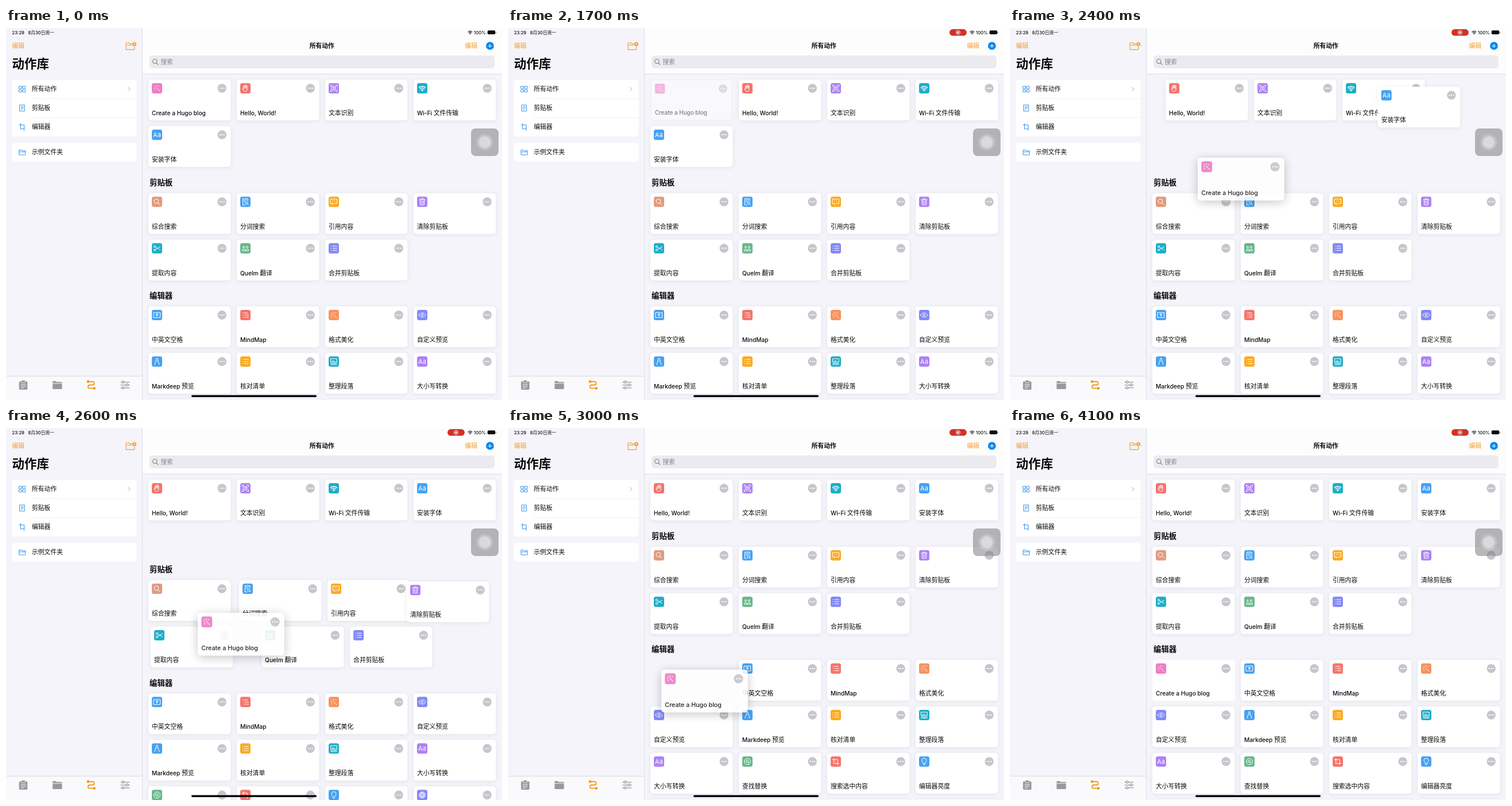
These frames come from a looping animation (864 px wide and 648 px high, 4.2 s). An HTML page:

```html
<!DOCTYPE html>
<html lang="zh-CN">
<head>
<meta charset="utf-8">
<title>动作库</title>
<style>
html, body { margin: 0; width: 100%; height: 100%; overflow: hidden; background: #f4f4fa; }
svg { display: block; }
text { font-family: Inter, "Noto Sans CJK SC", "Noto Sans CJK", "Noto Sans CJK JP", sans-serif; font-size: 10.8px; white-space: pre; fill: #0a0a0c; }
.en { font-size: .945em; }
.label { font-weight: 500; }
.head { font-size: 13.4px; font-weight: 600; }
.title { font-size: 21.5px; font-weight: 700; }
.status { font-size: 7.7px; font-weight: 500; }
.orange { fill: #f79a1f; }
.line { fill: none; stroke-linecap: round; stroke-linejoin: round; }
.card > rect:first-child { filter: drop-shadow(0 1px 3px rgba(20, 20, 50, .09)); }
</style>
</head>
<body>
<svg id="stage" width="864" height="648" viewBox="0 0 864 648"></svg>
<script>
const LOOP = 4200, STEP = 100;
const COL = 154, ROW = 81, LEFT = 248, TOP = 90, W = 143.5, H = 71;
const stage = document.getElementById('stage');

const ring = (x, y, r) => `M${x - r} ${y}a${r} ${r} 0 1 0 ${2 * r} 0a${r} ${r} 0 1 0 ${-2 * r} 0`;
const line = (d, color, width = 1) =>
  `<path class="line" d="${d}" stroke="${color}" stroke-width="${width}"/>`;
const box = (x, y, w, h, r, fill, extra = '') =>
  `<rect x="${x}" y="${y}" width="${w}" height="${h}" rx="${r}" fill="${fill}" ${extra}/>`;
const disc = (x, y, r, fill) => `<circle cx="${x}" cy="${y}" r="${r}" fill="${fill}"/>`;
const text = (x, y, s, cls = '', extra = '') => `<text x="${x}" y="${y}" class="${cls}" ${extra}>${s}</text>`;
const mixed = s => s.replace(/[A-Za-z,!\- ]+/g, m => `<tspan class="en">${m}</tspan>`);

const glyphs = {
  wand: 'M8 8l6 6M5 5l1 1M8.7 3.8v1.4M3.8 8.7h1.4M12.6 4.9l-1 1M4.9 12.6l1-1',
  hand: 'M5.6 9.8V6a.8.8 0 0 1 1.6 0V4.8a.8.8 0 0 1 1.6 0V4a.8.8 0 0 1 1.6 0v1a.8.8 0 0 1 1.6 0v5.5c0 2.5-1.4 4-3.4 4-2 0-3-1.3-4.6-4.4.3-.8 1-.8 1.6.2M7.2 6v3M8.8 5v4M10.4 5v4',
  scan: 'M3.5 6V3.5H6M12 3.5h2.5V6M14.5 12v2.5H12M6 14.5H3.5V12M6.2 6h5.6v6H6.2zM7.9 8.2h2.2M9 8.2v2.2',
  wifi: 'M3.6 7.9a7.8 7.8 0 0 1 10.8 0M5.5 10.2a5 5 0 0 1 7 0M7.5 12.2a2.3 2.3 0 0 1 3 0M9 13.6v.1',
  find: ring(8, 8, 3.8) + 'M10.9 10.9l3.4 3.4',
  docFind: 'M13 7.5v-4H4.5v11H8M6.5 6H11M6.5 8.3H8.5' + ring(11, 11.2, 2.2) + 'M12.6 12.8l1.7 1.7',
  quote: 'M3.5 4.3h11v7.7H8.3l-2.2 2v-2H3.5zM7.2 7.4v1.3M10.8 7.4v1.3',
  trash: 'M4 5.3h10M7 5V3.6h4V5M5.2 5.3l.5 9h6.6l.5-9M7.7 7.5v4.6M10.3 7.5v4.6',
  cut: ring(5, 6, 1.6) + ring(5, 12, 1.6) + 'M6.4 7l8 4.7M6.4 11l8-4.7',
  people: ring(6, 7, 1.5) + ring(12, 7, 1.5) + 'M3.2 13c0-3.6 5.6-3.6 5.6 0zM9.2 13c0-3.6 5.6-3.6 5.6 0z',
  list: 'M7 5.3h7.3M7 9h7.3M7 12.7h7.3M4 5.3h.4M4 9h.4M4 12.7h.4',
  frame: 'M3.3 4.7h11.4v8.6H3.3zM7.2 7.2h3.6M9 6.6v4.6M7.4 9.2h3.2',
  mind: 'M3.8 5.3h.3M6.3 5.3h6.5M5.3 9h.3M7.8 9h6.5M5.3 12.7h.3M7.8 12.7h6.5',
  eye: 'M2.9 9c3-5 9.2-5 12.2 0-3 5-9.2 5-12.2 0z' + ring(9, 9, 1.7),
  compass: 'M8.4 3.4L5 14.5M9.6 3.4l3.4 11.1M8.4 3.4h1.2M8 8a1.2 1.2 0 0 0 2 0',
  panel: 'M3.8 4h10.4v6H3.8zM6 8h4M3.8 12.2h10.4M3.8 14.3h10.4',
  lens: ring(9, 9, 5.4) + ring(8.6, 8.6, 2.1) + 'M10.2 10.2l1.8 1.8',
  crop: 'M5.7 3.2v9.1h9M3.2 5.7h9.1v9',
  bulb: 'M7.2 12c0-1.8-2.1-2.4-2.1-4.9a3.9 3.9 0 0 1 7.8 0c0 2.5-2.1 3.1-2.1 4.9zM7.4 14.2h3.2',
  globe: ring(9, 9, 5.3) + 'M3.7 9h10.6M4.6 6.3h8.8M4.6 11.7h8.8M9 3.7c-3 3-3 7.6 0 10.6 3-3 3-7.6 0-10.6'
};

const BLUE = '#46a2f3', RED = '#f5746c', VIOLET = '#ac82f7', TEAL = '#1eadc9',
  AMBER = '#fbaa20', GREEN = '#67b88a', INDIGO = '#8388f7', PINK = '#f07bc4';

const groups = {
  top: [['Hello, World!', RED, 'hand'], ['文本识别', VIOLET, 'scan'],
    ['Wi-Fi 文件传输', TEAL, 'wifi'], ['安装字体', BLUE, 'Aa']],
  clip: [['综合搜索', '#e29a7e', 'find'], ['分词搜索', BLUE, 'docFind'], ['引用内容', AMBER, 'quote'],
    ['清除剪贴板', VIOLET, 'trash'], ['提取内容', TEAL, 'cut'], ['Quelm 翻译', GREEN, 'people'],
    ['合并剪贴板', INDIGO, 'list']],
  edit: [['中英文空格', BLUE, 'frame'], ['MindMap', RED, 'mind'], ['格式美化', '#f8925f', 'wand'],
    ['自定义预览', INDIGO, 'eye'], ['Markdeep 预览', BLUE, 'compass'], ['核对清单', AMBER, 'list'],
    ['整理段落', TEAL, 'panel'], ['大小写转换', VIOLET, 'Aa'], ['查找替换', GREEN, 'lens'],
    ['搜索选中内容', RED, 'crop'], ['编辑器亮度', BLUE, 'bulb'], ['网页预览', INDIGO, 'globe'],
    ['文本统计', TEAL, 'list'], ['插入日期', AMBER, 'panel'], ['文本排序', RED, 'mind']]
};

function card([name, color, glyph], id = '') {
  const mark = glyph === 'Aa'
    ? text(15, 19, 'Aa', '', 'text-anchor="middle" style="fill:#fff;font-size:11px"')
    : `<g transform="translate(6 6)">${line(glyphs[glyph], '#fff', glyph === 'wifi' ? 1.5 : 1)}</g>`;
  return `<g class="card" ${id && `id="${id}"`}>` + box(0, 0, W, H, 5, '#fff') + box(6, 6, 18, 18, 3.5, color) + mark +
    disc(128.2, 15, 7.7, '#c5c5ca') + [124.7, 128.2, 131.7].map(x => disc(x, 15, 1.15, '#fff')).join('') +
    text(6, 62, mixed(name), 'label') + '</g>';
}

function sidebar() {
  const sky = '#3994e8', gray = '#98989d', orange = '#f79a1f';
  const rows = [['所有动作', 106], ['剪贴板', 139], ['编辑器', 172], ['示例文件夹', 216]];
  return box(0, 0, 238, 648, 0, '#f4f4fa') +
    text(10.5, 10.7, '23:29', 'status') + text(38.5, 10.7, '8月30日周一', 'status') +
    text(10.5, 35, '编辑', 'orange') + text(10.5, 70.3, '动作库', 'title') +
    line('M209 37.5V27a1.3 1.3 0 0 1 1.3-1.3h3.6l1.6 1.9h4M209 30h10.5M209 36.3a1.3 1.3 0 0 0 1.3 1.3h12.2a1.3 1.3 0 0 0 1.3-1.3V32.5', orange, 1.1) +
    disc(223.6, 28.2, 3.4, orange) + line('M221.9 28.2h3.4M223.6 26.5v3.4', '#fff', .8) +
    box(10.5, 90, 217, 99, 5, '#fff') + box(10.5, 200, 217, 33, 5, '#fff') +
    box(45, 122.7, 182.5, .7, 0, '#e6e6ea') + box(45, 155.6, 182.5, .7, 0, '#e6e6ea') +
    rows.map(([s, y]) => text(45, y + 4.2, s)).join('') +
    line('M22.8 101.6h4.5v3.8h-4.5zM29.3 101.6h4.5v3.8h-4.5zM22.8 107.6h4.5v3.8h-4.5zM29.3 107.6h4.5v3.8h-4.5z', sky) +
    line('M24 134h8.4v10.8H24zM26 137h4.4M26 139.4h4.4M26 141.8h2', sky) +
    line('M25.3 166.5v9.2h5.5M23 168.7h8.6v9.3', sky, 1.1) +
    line('M22.8 220.6v-8.2h3.8l1.3 1.4h5.9v6.8zM22.8 215.8h11', sky) +
    line('M212.6 102.9l3.4 3.4-3.4 3.4', '#a9a9ae') +
    box(0, 606, 238, 42, 0, '#fafafc') + box(0, 606, 238, .8, 0, '#d5d5da') +
    box(22.7, 615.5, 14.6, 14.5, 1.8, gray) + box(26.5, 613.6, 7, 4.4, 1.2, gray, 'stroke="#fafafc" stroke-width=".8"') +
    line('M26 621h8M26 624h8M26 627h5', '#fafafc', 1.1) +
    `<path d="M81.2 616.2a1.2 1.2 0 0 1 1.2-1.2h4l1.6 1.5h8.4a1.2 1.2 0 0 1 1.2 1.2v.7H81.2zM81.2 619.4h16.4v8.4a1.2 1.2 0 0 1-1.2 1.2h-14a1.2 1.2 0 0 1-1.2-1.2z" fill="${gray}"/>` +
    line('M143.5 616h7.3a2.9 2.9 0 0 1 0 5.8h-5a2.9 2.9 0 0 0 0 5.8h7.5', orange, 1.9) +
    disc(143, 616, 2.4, orange) + disc(153.8, 627.6, 2.4, orange) +
    line('M200 616.8h15M200 621.8h15M200 626.8h15', gray, 1.3) +
    [[204, 616.8], [211, 621.8], [204, 626.8]].map(([x, y]) =>
      `<circle cx="${x}" cy="${y}" r="1.9" fill="#fafafc" stroke="${gray}" stroke-width="1.2"/>`).join('') +
    box(237, 0, 1, 648, 0, '#dedee3');
}

function topBar() {
  return box(238, 0, 626, 80, 0, '#fdfdfe') + box(238, 79.7, 626, .8, 0, '#d6d6da') +
    text(550.3, 35.1, '所有动作', 'label', 'text-anchor="middle" style="font-weight:600"') +
    text(799.5, 35.1, '编辑', 'orange') +
    disc(843, 31.2, 6.9, '#0a86ea') + line('M840 31.2h6M843 28.2v6', '#fff', 1.1) +
    box(250, 47.8, 601, 22.4, 6, '#ebebef') +
    line(ring(259.3, 58, 3.7) + 'M262 60.8l3 3', '#77777c', 1.1) +
    text(269.3, 63, '搜索', '', 'style="fill:#85858a"') +
    `<g id="rec">${box(769, 2, 30, 11.6, 5.8, '#d23127')}${line(ring(784, 7.8, 3.6), '#fff', .9)}${disc(784, 7.8, 1.8, '#fff')}</g>` +
    line('M805 6.9a5 5 0 0 1 7 0M806.6 8.7a2.8 2.8 0 0 1 3.8 0', '#0a0a0c', 1.2) + disc(808.5, 10.3, .9, '#0a0a0c') +
    text(815, 10.7, '100%', 'status') +
    box(838.8, 4.3, 13.4, 6.8, 1.8, '#0a0a0c') + box(852.9, 6.4, 1, 2.6, .5, '#55555a');
}

function overlay() {
  return box(323, 639.6, 218, 3.4, 1.7, '#000') +
    box(810, 175, 48, 48, 8, '#77777c', 'fill-opacity=".52"') +
    disc(834, 199, 15, 'rgba(255,255,255,.13)') + disc(834, 199, 12.5, 'rgba(255,255,255,.17)') +
    disc(834, 199, 10, 'rgba(255,255,255,.35)');
}

const dragged = ['Create a Hugo blog', PINK, 'wand'];
stage.innerHTML = box(238, 0, 626, 648, 0, '#f4f4fa') +
  text(250, 0, '剪贴板', 'head', 'id="clipHead"') + text(250, 0, '编辑器', 'head', 'id="editHead"') +
  card(dragged, 'cell') +
  Object.entries(groups).map(([key, items]) => items.map((it, i) => card(it, key + i)).join('')).join('') +
  topBar() + sidebar() + card(dragged, 'lift') + overlay();

const el = id => document.getElementById(id);

// Each key is [ms, value...]; values are interpolated linearly.
const tracks = {
  cell: [[1500, 1, 1], [1600, .75, .985], [1700, .5, .97], [2000, .5, .97], [2100, .5, 1], [2200, .5, 1], [2400, 0, 1]],
  topShift: [[2200, 0], [2300, .35], [2400, .85], [2500, 1]],
  collapse: [[2500, 0], [2600, .28], [2700, .7], [2800, .94], [2900, 1]],
  clipNear: [[2500, 0], [2600, .026], [2700, 0]],
  clipFar: [[2500, 0], [2600, .28], [2700, .65], [2800, .45], [2900, .1], [3000, 0]],
  editShift: [[2700, 0], [2800, .3], [2900, .85], [3000, 1]],
  // x, y, scale, opacity, shadow
  lift: [[2000, 248, 90, 1, .9, 0], [2100, 262, 98, 1.04, .88, .6], [2200, 296, 122, 1.05, .88, 1],
    [2400, 327, 226, 1.05, .88, 1], [2600, 334, 322, 1.05, .88, 1], [2800, 306, 386, 1.05, .88, 1],
    [3000, 267, 421, 1.05, .88, 1], [3200, 261, 423, 1.05, .88, 1], [3400, 252, 409, 1.02, .95, .5],
    [3500, 248, 404, 1, 1, 0]]
};

function at(name, t) {
  const keys = tracks[name], n = keys.findIndex(k => k[0] > t);
  if (n === 0) return keys[0].slice(1);
  if (n < 0) return keys[keys.length - 1].slice(1);
  const a = keys[n - 1], b = keys[n], u = (t - a[0]) / (b[0] - a[0]);
  return a.slice(1).map((v, i) => v + (b[i + 1] - v) * u);
}

const slot = i => [LEFT + COL * (i % 4), ROW * Math.floor(i / 4)];

function put(node, from, to, u, y0) {
  const [ax, ay] = slot(from), [bx, by] = slot(to);
  node.setAttribute('transform', `translate(${ax + (bx - ax) * u} ${y0 + ay + (by - ay) * u})`);
}

function draw(t) {
  const [up] = at('topShift', t), [gone] = at('collapse', t), [near] = at('clipNear', t),
    [far] = at('clipFar', t), [push] = at('editShift', t), lift = -ROW * gone;

  groups.top.forEach((_, i) => put(el('top' + i), i + 1, i, up, TOP));
  groups.clip.forEach((_, i) => put(el('clip' + i), i, i + 1, i === 0 ? 0 : i < 5 ? near : far, 287.7 + lift));
  groups.edit.forEach((_, i) => put(el('edit' + i), i, i + 1, push, 485 + lift));
  el('clipHead').setAttribute('y', 274 + lift);
  el('editHead').setAttribute('y', 471.4 + lift);

  const [alpha, s] = at('cell', t), cell = el('cell');
  cell.setAttribute('transform', `translate(${LEFT + W * (1 - s) / 2} ${TOP + H * (1 - s) / 2}) scale(${s})`);
  cell.style.opacity = alpha;

  const [x, y, k, o, shade] = at('lift', t), node = el('lift');
  node.setAttribute('transform', `translate(${x} ${y}) scale(${k})`);
  node.style.opacity = t < 2000 ? 0 : o;
  node.firstChild.style.filter = `drop-shadow(0 3px 8px rgba(0,0,0,${.26 * shade}))`;
  el('rec').style.opacity = t < 400 ? 0 : 1;
}

let start = null, last = -1;
function tick(now) {
  if (start === null) start = now;
  const t = Math.floor((now - start) % LOOP / STEP) * STEP;
  if (t !== last) draw(last = t);
  requestAnimationFrame(tick);
}
draw(0);
requestAnimationFrame(tick);
</script>
</body>
</html>
```
